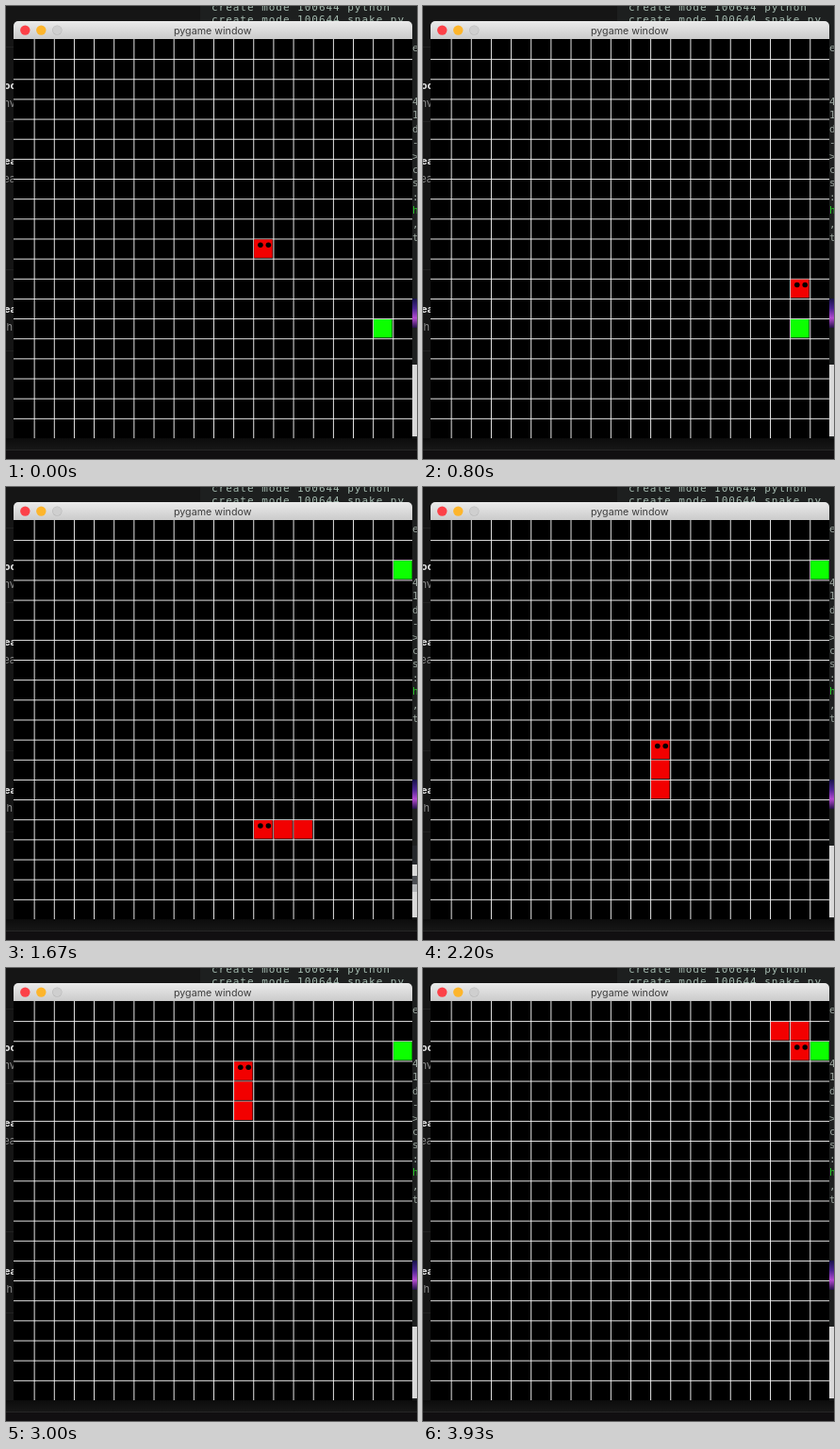
These frames come from a looping animation (436 px wide and 480 px high, 3990 ms). An HTML page with a canvas:

```html
<!DOCTYPE html>
<html lang="en">
<head>
<meta charset="utf-8">
<title>Snake</title>
<style>
  html, body { margin: 0; width: 100%; height: 100%; overflow: hidden; background: #141414; }
  canvas { display: block; }
</style>
</head>
<body>
<canvas id="stage" width="436" height="480"></canvas>
<script>
const ctx = document.getElementById('stage').getContext('2d');
const LOOP = 3990;
const CELL = 25, ROWS = 20, SCALE = 0.846; // board is 500 units wide, shown scaled
const MONO = '"DejaVu Sans Mono", monospace';
const SANS = 'Inter, sans-serif';

// Head positions, one per game tick
const DIRS = { R: [1, 0], L: [-1, 0], U: [0, -1], D: [0, 1] };
const path = [[12, 10]];
for (const [, dir, count] of 'R6 D5 L7 U14 R7 D1'.matchAll(/(\w)(\d+)/g)) {
  for (let i = 0; i < +count; i++) {
    const [x, y] = path[path.length - 1];
    path.push([x + DIRS[dir][0], y + DIRS[dir][1]]);
  }
}
const meals = [{ tick: 10, at: [18, 14] }, { tick: 15, at: [14, 15] }, { tick: Infinity, at: [19, 2] }];

function rect(color, x, y, w, h) {
  ctx.fillStyle = color;
  ctx.fillRect(x, y, w, h);
}

function disc(color, x, y, r) {
  ctx.fillStyle = color;
  ctx.beginPath();
  ctx.arc(x, y, r, 0, 2 * Math.PI);
  ctx.fill();
}

function text(str, x, y, color, font, spacing = 0) {
  ctx.font = font;
  ctx.letterSpacing = spacing + 'px';
  ctx.fillStyle = color;
  ctx.fillText(str, x, y);
}

function gradient(y0, y1, ...colors) {
  const g = ctx.createLinearGradient(0, y0, 0, y1);
  colors.forEach((c, i) => g.addColorStop(i / (colors.length - 1), c));
  return g;
}

function drawDesktop(t) {
  rect('#151515', 0, 0, 436, 480);
  for (const y of [43, 122, 279, 365]) rect('#222', 0, y, 8, 1);
  rect('#1d1f1f', 206, 0, 230, 458);
  rect(gradient(458, 471, '#0c0c0c', '#181818'), 0, 458, 436, 13);
  rect('#262626', 0, 470, 436, 1);
  rect('#110f11', 0, 471, 436, 9);

  // Page text at the left, cut off by the window
  ctx.textAlign = 'right';
  const bold = '700 11px ' + SANS, plain = '11px ' + SANS;
  [['oc', 88], ['ea', 168], ['ea', 325]].forEach(([s, y]) => text(s, 11, y, '#e4e4e4', bold));
  [['nv', 107], ['ea', 187], ['h', 344]].forEach(([s, y]) => text(s, s === 'h' ? 7 : 10, y, '#8c8c8c', plain));

  // Terminal behind the window
  ctx.textAlign = 'left';
  const mono = '11px ' + MONO;
  text('create mode 100644 python', 218, 5, '#a3b9ae', mono, 0.97);
  text('create mode 100644 snake.py', 218, 18, '#a3b9ae', mono, 0.97);
  text('e', 431, 48, '#9aa59f', mono);
  [...'41d->cs:h,t'].forEach((ch, i) =>
    text(ch, 431, 105 + i * 14.4, ch === 'h' ? '#28c428' : '#9aa59f', mono));

  rect(gradient(310, 341, '#17134a', '#4a2390', '#b34bd0', '#231248'), 431, 310, 5, 31);
  rect('#d9d9d9', 431, 380, 5, 76);
  if (t >= 930 && t < 2130) {
    rect('#25282c', 431, 380, 5, 20);
    rect('#4a4d52', 431, 412, 5, 9);
    rect('#b5b7ba', 431, 421, 5, 8);
  }
}

function drawWindow() {
  ctx.fillStyle = gradient(16, 35, '#ebebeb', '#cbcbcb');
  ctx.beginPath();
  ctx.roundRect(8, 16, 423, 20, [5, 5, 0, 0]);
  ctx.fill();
  disc('#fc4148', 20.3, 25.6, 5.2);
  disc('#fdb52c', 37.3, 25.6, 5.2);
  disc('#b9b9b9', 54.3, 25.6, 5.2);
  disc('#cfcfcf', 54.3, 25.6, 4.6);
  ctx.textAlign = 'center';
  text('pygame window', 219.2, 29.6, '#3c3c3c', '10.7px ' + SANS);
  rect('#000', 8, 35, 423, 423);
}

function cube(color, [x, y]) {
  rect(color, x * CELL + 1, y * CELL + 1, CELL - 2, CELL - 2);
}

function drawBoard(tick) {
  ctx.save();
  ctx.beginPath();
  ctx.rect(8, 35, 423, 423);
  ctx.clip();
  ctx.translate(8.5, 35);
  ctx.scale(SCALE, SCALE);
  for (let i = 1; i < ROWS; i++) {
    rect('#f4f4f4', i * CELL, -1, 1.1, 502);
    rect('#f4f4f4', -1, i * CELL, 502, 1.1);
  }
  const eaten = meals.findIndex(meal => tick < meal.tick);
  cube('#0cff00', meals[eaten].at);
  for (let i = 0; i <= eaten; i++) cube('#f20000', path[tick - i]);
  const [x, y] = path[tick];
  for (const eye of [9, 19]) disc('#000', x * CELL + eye, y * CELL + 8, 3.3);
  ctx.restore();
}

function frame(now) {
  const t = now % LOOP;
  const phase = t % 200;
  // Two ticks in every 200 ms
  const tick = 2 * Math.floor(t / 200) + (phase >= 70) + (phase >= 130);
  drawDesktop(t);
  drawWindow();
  drawBoard(tick);
  requestAnimationFrame(frame);
}
frame(0);
</script>
</body>
</html>
```
